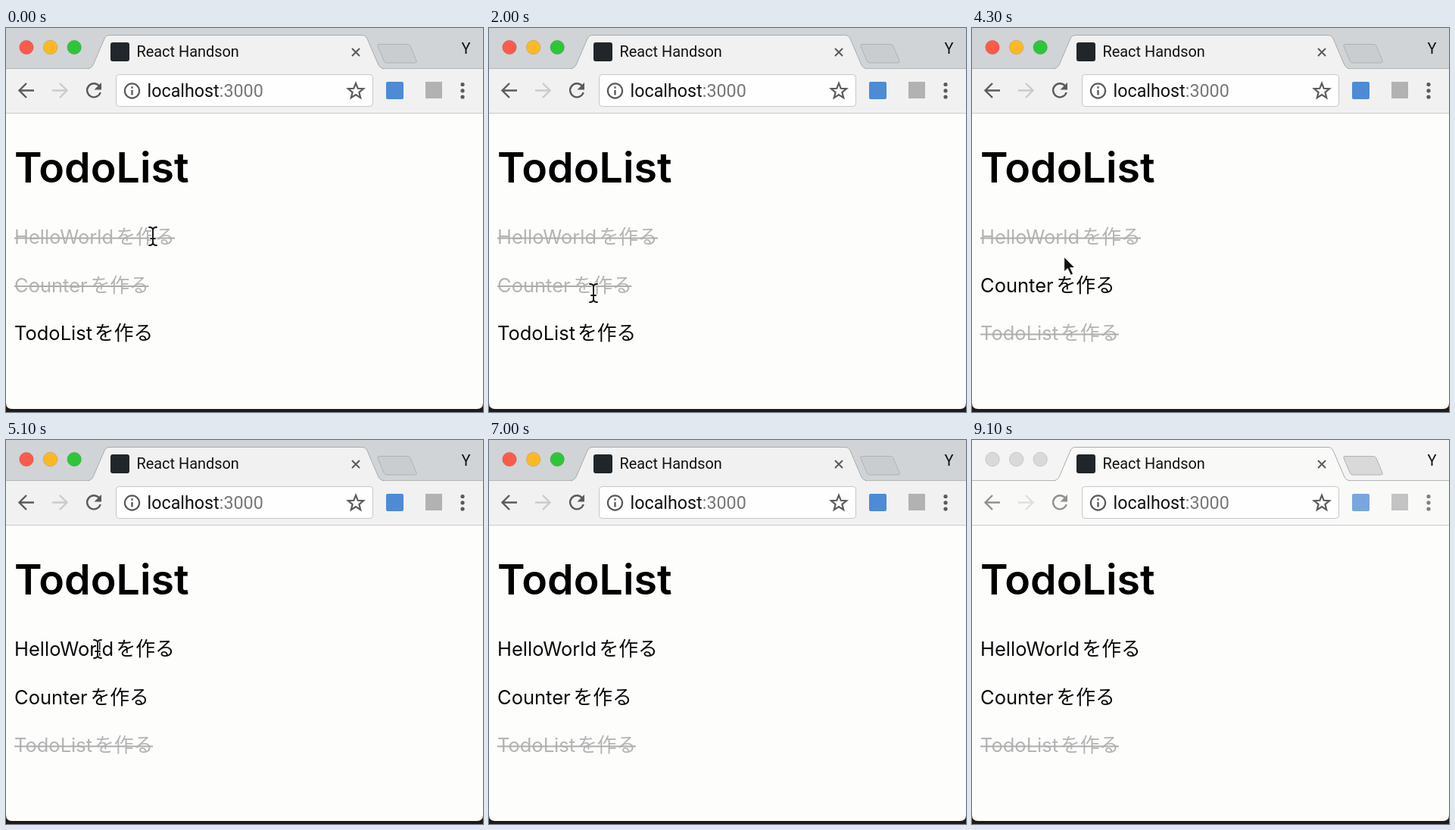
Write an HTML page that moves like this. It is 630x507 px and loops after 9200 ms.

```html
<!DOCTYPE html>
<html lang="ja">
<head>
<meta charset="utf-8">
<title>TodoList</title>
<style>
  html, body { margin: 0; width: 100%; height: 100%; overflow: hidden; background: #211a17; }
  svg { display: block; width: 630px; height: 507px; }
  .ui { font-family: Roboto, Inter, sans-serif; }
  .page { font-family: Inter, "Liberation Sans", sans-serif; }
  .jp { font-family: "Noto Sans CJK JP", "Noto Sans CJK", sans-serif; font-size: 25.8px; }
  .line { fill: none; stroke: #5a5a5a; stroke-width: 2.4; }
</style>
</head>
<body>
<svg viewBox="0 0 630 507" xmlns="http://www.w3.org/2000/svg">
  <rect width="630" height="507" fill="#211a17"/>
  <path d="M0 0H630V495Q630 503 622 503H8Q0 503 0 495Z" fill="#fdfdfc"/>

  <!-- tab strip and toolbar -->
  <rect id="strip" width="630" height="54"/>
  <rect id="bar" y="53" width="630" height="59"/>
  <path d="M0 53.5H630" stroke="#b4b6b6"/>
  <path d="M0 112.5H630" stroke="#cbcbcb"/>
  <path id="tab" d="M108 54Q113 53 115 49L130 14Q132 9.5 137 9.5H470Q475 9.5 477 14L492 49Q494 53 499 54" stroke="#a9abab"/>
  <path id="plus" d="M493 21.5H530Q533 21.5 534 24L542 43Q543 46 540 46H503Q500 46 499 43L491 24Q490 21.5 493 21.5Z" stroke="#b1b1b6"/>
  <g id="lights" stroke-opacity=".12" stroke="#000"></g>
  <rect x="138" y="19" width="25" height="25" rx="3" fill="#20262a"/>
  <g class="ui" fill="#111">
    <text x="172.5" y="38" font-size="19.9">React Handson</text>
    <text x="601.5" y="33.5" font-size="20">Y</text>
  </g>
  <path class="line" d="M457 27L467 37M467 27L457 37" style="stroke-width:2"/>

  <g id="nav">
    <path class="line" d="M37 82.5H18M27 73L17.5 82.5L27 92"/>
    <path class="line" d="M61 82.5H80M71 73L80.5 82.5L71 92" opacity=".25"/>
    <path class="line" d="M123 76.5A9 9 0 1 0 124.700 85"/>
    <path d="M126 72V81.5H116.500Z" fill="#5a5a5a"/>
  </g>
  <rect x="145.5" y="61.5" width="339" height="42" rx="4" fill="#fefefe" stroke="#c6c6c6"/>
  <circle class="line" cx="166.5" cy="83" r="9.6" style="stroke-width:2.2"/>
  <path class="line" d="M166.5 82V88.5M166.5 77.3V79.8"/>
  <text class="ui" x="186.5" y="91" font-size="23.3" fill="#111">localhost<tspan fill="#777">:3000</tspan></text>
  <path id="star" class="line" style="stroke-width:2.2"/>
  <g id="tools">
    <rect x="502" y="71" width="23" height="23" rx="2" fill="#4e8bd4"/>
    <rect x="554" y="71" width="22" height="22" fill="#b2b2b2"/>
    <g id="dots" fill="#5a5a5a"></g>
  </g>

  <!-- page -->
  <g class="page">
    <text x="11" y="203.5" font-size="55.5" font-weight="600" fill="#000">TodoList</text>
    <g id="list"></g>
  </g>

  <g id="beam" fill="none" stroke-linecap="round"></g>
  <path id="arrow" d="M0 0V22L5 17.5L9 26L13 24L9.3 16H16Z" fill="#111" stroke="#fdfdfc" stroke-width="1.8"/>
  <path id="resize" d="M-7 -5H-2V3H-7L0 11L7 3H2V-5H7" fill="#111" stroke="#fdfdfc" stroke-width="1.5"/>
</svg>
<script>
const LOOP = 9200, BLUR_AT = 8900;
const $ = id => document.getElementById(id);

function add(parent, tag, attrs, text) {
  const el = document.createElementNS("http://www.w3.org/2000/svg", tag);
  for (const k in attrs) el.setAttribute(k, attrs[k]);
  if (text) el.textContent = text;
  parent.append(el);
  return el;
}

const colors = ["#fb5b4c", "#fdb924", "#2fc53b"];
const lights = colors.map((fill, i) => add($("lights"), "circle", { cx: 27 + i * 31.6, cy: 25.5, r: 9.3, fill }));
for (const cy of [74.5, 82.8, 91]) add($("dots"), "circle", { cx: 603, cy, r: 2.6 });

const points = Array.from({ length: 10 }, (_, i) => {
  const a = -Math.PI / 2 + i * Math.PI / 5, r = i % 2 ? 4.6 : 10.6;
  return (462 + r * Math.cos(a)).toFixed(1) + " " + (83.5 + r * Math.sin(a)).toFixed(1);
});
$("star").setAttribute("d", "M" + points.join("L") + "Z");

// A light halo under the dark text cursor.
const beam = "M-5 -12Q0 -12 0 -8Q0 -12 5 -12M0 -8V8M-5 12Q0 12 0 8Q0 12 5 12M-3 3H3";
add($("beam"), "path", { d: beam, stroke: "#fff", "stroke-width": 4 });
add($("beam"), "path", { d: beam, stroke: "#111", "stroke-width": 1.9 });

// "done" tells when each item is struck out.
const items = [
  { name: "HelloWorld", y: 285, jp: 145.5, end: 223, done: t => t < 4800 },
  { name: "Counter", y: 348.5, jp: 111.5, end: 188.5, done: t => t < 2600 },
  { name: "TodoList", y: 412, jp: 117, end: 194, done: t => t >= 3800 }
];
for (const it of items) {
  it.group = add($("list"), "g", {});
  add(it.group, "text", { x: 11, y: it.y, "font-size": 25.5 }, it.name);
  add(it.group, "text", { x: it.jp, y: it.y, class: "jp" }, "を作る");
  it.strike = add(it.group, "path", { d: `M11 ${it.y - 7.5}H${it.end}`, stroke: "#adadad", "stroke-width": 2 });
}

// Pointer moves: start, end, and the place reached.
const home = [194, 275];
const moves = [
  [400, 1700, 138, 350],
  [3100, 3650, 122, 402],
  [3950, 4440, 121, 276],
  [5100, 5800, 44, 3],
  [5900, 6200, 42, -40]
];

function pointer(t) {
  let [x, y] = home;
  for (const [from, to, mx, my] of moves) {
    const k = Math.min(1, Math.max(0, (t - from) / (to - from)));
    const s = k * k * (3 - 2 * k);
    x += (mx - x) * s;
    y += (my - y) * s;
  }
  return [x, y];
}

function show(el, on, x, y) {
  el.style.display = on ? "" : "none";
  el.setAttribute("transform", `translate(${x.toFixed(1)} ${y.toFixed(1)})`);
}

function draw(time) {
  const t = Math.floor(time % LOOP / 100) * 100;
  const active = t < BLUR_AT;
  const fill = (id, on, off) => $(id).setAttribute("fill", active ? on : off);
  fill("strip", "#d0d4d6", "#f4f4f4");
  fill("bar", "#f0f1f0", "#f9f9f8");
  fill("tab", "#f0f1f0", "#f9f9f8");
  fill("plus", "#cacdcf", "#d9d9d9");
  lights.forEach((c, i) => c.setAttribute("fill", active ? colors[i] : "#d9d9d9"));
  $("nav").setAttribute("opacity", active ? 1 : .65);
  $("tools").setAttribute("opacity", active ? 1 : .75);

  for (const it of items) {
    const done = it.done(t);
    it.group.setAttribute("fill", done ? "#b5b5b5" : "#0a0a0a");
    it.strike.style.display = done ? "" : "none";
  }

  const [x, y] = pointer(t);
  const overText = items.some(it => y > it.y - 26 && y < it.y + 6 && x < it.end);
  const atEdge = y < 6;
  show($("beam"), overText, x, y);
  show($("arrow"), !overText && !atEdge, x, y);
  show($("resize"), atEdge, x, y);
}

const start = performance.now();
function tick() {
  draw(performance.now() - start);
  requestAnimationFrame(tick);
}
tick();
</script>
</body>
</html>
```
